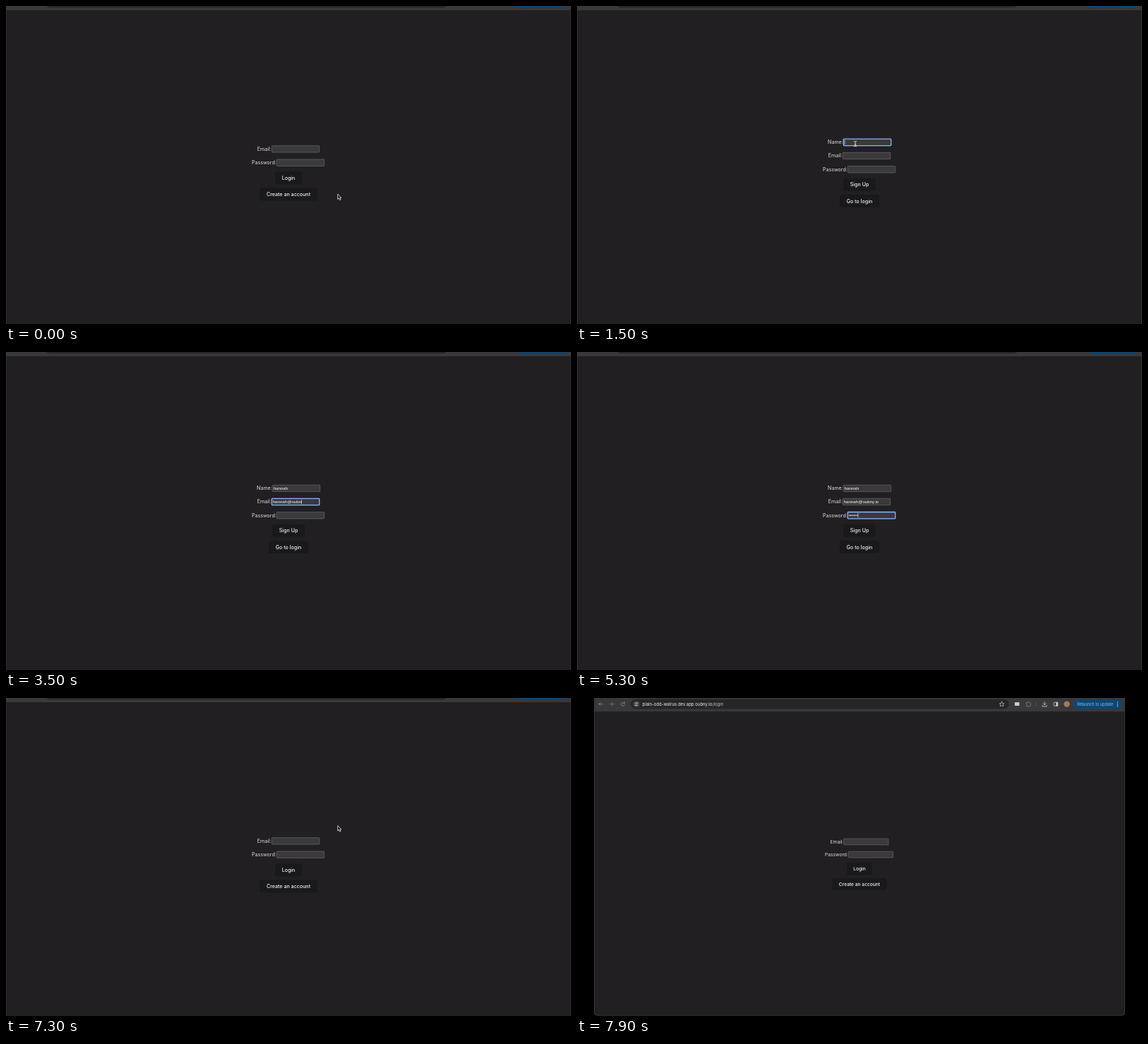
These frames come from a looping animation (800x450 px, 8 s). An HTML page:

```html
<!DOCTYPE html>
<html lang="en">
<head>
<meta charset="utf-8">
<title>Sign up flow</title>
<style>
  html, body { margin: 0; width: 100%; height: 100%; overflow: hidden; background: #000; }
  svg { display: block; width: 100%; height: 100%; }
  text { font-family: Inter, "Open Sans", sans-serif; white-space: pre; }
  .field { font-family: "Liberation Sans", Arial, sans-serif; font-size: 6.15px; fill: #fff; }
  .label { font-size: 7.1px; fill: #dededf; text-anchor: end; }
  .button { font-size: 7.1px; font-weight: 500; fill: #f4f4f5; text-anchor: middle; }
  .line { fill: none; stroke-linecap: round; stroke-linejoin: round; }
</style>
</head>
<body>
<svg id="stage" viewBox="0 0 800 450" preserveAspectRatio="none"></svg>
<script>
const LOOP = 8000, STEP = 100;
const ZOOM = { x: 24.4, y: 13.4, scale: 0.939 };
const NAME = "hannah", EMAIL = "hannah@oubny.io", PASSWORD = "•".repeat(10);
const RING = "#8cb6f2";

const clamp = v => Math.max(0, Math.min(1, v));

// Linear interpolation through [time, value...] keys.
function track(keys, t) {
  if (t <= keys[0][0]) return keys[0].slice(1);
  for (let i = 1; i < keys.length; i++) {
    const [a, b] = [keys[i - 1], keys[i]];
    if (t <= b[0]) {
      const k = (t - a[0]) / (b[0] - a[0]);
      return a.slice(1).map((v, j) => v + (b[j + 1] - v) * k);
    }
  }
  return keys[keys.length - 1].slice(1);
}

const rect = (x, y, w, h, r, fill, extra = "") =>
  `<rect x="${x}" y="${y}" width="${w}" height="${h}" rx="${r}" fill="${fill}" ${extra}/>`;
const line = (d, color, width = 0.8) =>
  `<path class="line" d="${d}" stroke="${color}" stroke-width="${width}"/>`;
const text = (x, y, size, fill, str, extra = "") =>
  `<text x="${x}" y="${y}" font-size="${size}" fill="${fill}" ${extra}>${str}</text>`;

function inputRow(id, label, x, y) {
  return `<text class="label" x="${x - 0.2}" y="${y + 2.4}">${label}</text>` +
    rect(x + 0.3, y - 4.7, 67.4, 9.4, 0.8, "#3a393c", `id="${id}-box" stroke="#727174" stroke-width="0.6"`) +
    `<text class="field" id="${id}-text" x="${x + 1.7}" y="${y + 2.1}"></text>` +
    `<path id="${id}-caret" stroke="#fff" stroke-width="0.6"/>`;
}

function button(id, label, y, w) {
  return rect(400 - w / 2, y - 9, w, 18, 3.5, "#19181a", `id="${id}-box"`) +
    `<text class="button" id="${id}-text" x="400" y="${y + 2.5}">${label}</text>`;
}

function asterisk(x, y, r, color, width) {
  let d = "";
  for (let i = 0; i < 3; i++) {
    const a = Math.PI / 2 + i * Math.PI / 3, dx = r * Math.cos(a), dy = r * Math.sin(a);
    d += `M${x - dx} ${y - dy}L${x + dx} ${y + dy}`;
  }
  return line(d, color, width);
}

// Drawn in the coordinates of the fully zoomed-out window.
function toolbar() {
  const soft = "#8b8a8d", bright = "#c9c8cb";
  return rect(24.4, -30, 751.2, 49, 0, "#39383b") +
    line("M36.5 8.5H31M33.5 6L31 8.5L33.5 11", soft) +
    line("M46 8.5H51.5M49 6L51.5 8.5L49 11", "#77767a") +
    line("M67.3 7.4A2.6 2.6 0 1 0 67.5 9.4M67.5 5.6V7.6H65.5", soft) +
    rect(76, 1.8, 535.5, 13.8, 6.9, "#262528") +
    `<circle cx="84" cy="8.7" r="5" fill="#39383b"/>` +
    line("M81.5 7.2H83.5M85.5 7.2H86.5M81.5 10.2H82.5M84.7 10.2H86.5", "#e0e0e2", 0.7) +
    `<circle cx="84.5" cy="7.2" r=".9" fill="none" stroke="#e0e0e2" stroke-width=".6"/>` +
    `<circle cx="83.6" cy="10.2" r=".9" fill="none" stroke="#e0e0e2" stroke-width=".6"/>` +
    text(92.5, 10.8, 6, "#f0f0f2", `plain-odd-walrus.dev.app.oubny.io<tspan fill="#c0bfc2">/login</tspan>`) +
    line("M601.5 5.2L602.5 7.5L605 7.8L603.1 9.4L603.7 11.9L601.5 10.6L599.3 11.9L599.9 9.4L598 7.8L600.5 7.5Z", bright, 0.7) +
    rect(619.8, 5.9, 6.6, 5.2, 0.6, bright) +
    line("M636.3 6.5H638A1 1 0 0 1 640 6.5H641.8V8A1 1 0 0 1 641.8 10V11.7H636.3V10A1 1 0 0 0 636.3 8Z", soft, 0.7) +
    line("M650.5 5.2V12", "#5d5c60", 0.6) +
    line("M662 5.4V9.7M660 7.8L662 9.8L664 7.8M659 10.5V12H665V10.5", bright) +
    rect(675.2, 6, 5.6, 5.4, 0.7, "none", `stroke="${bright}" stroke-width=".8"`) +
    rect(678.2, 6, 2.6, 5.4, 0.4, bright) +
    `<circle cx="693.5" cy="8.6" r="4.2" fill="#a87a4c"/>` +
    rect(702.5, 1.8, 69, 13.8, 6.9, "#0d4672") +
    text(708.2, 10.7, 5.6, "#8fbde3", "Relaunch to update") +
    [6, 8.7, 11.4].map(y => `<circle cx="765.4" cy="${y}" r=".8" fill="#b5d8f5"/>`).join("");
}

function popup() {
  const dim = "#3b3b3e", blue = "#a8c7fa", body = "#c4c3c6";
  const copy = [
    "The password that you just used was found in a data breach. To secure",
    "your accounts, Pelnor Password Manager recommends changing it",
    "now and checking your saved passwords."
  ];
  return rect(297.5, 2, 205, 149, 6, "#1e1d1f") +
    rect(297.5, 2, 205, 56, 6, "#1b1a1c") +
    line("M298 34C306 33 306 42 315 43S328 35 340 39", dim, 1.6) +
    line("M415 27C417 17 426 19 433 18S445 10 447 3", dim, 1.6) +
    asterisk(322, 26, 4.3, "#4a494d", 1.5) +
    rect(349, 10, 29, 42, 2, "#222124", `stroke="${dim}" stroke-width=".8"`) +
    rect(367, 15, 47, 30, 1.5, "#232225", `stroke="${dim}" stroke-width=".8"`) +
    line("M359 46.5H420M356 10H371", dim, 1.4) +
    rect(375, 26.5, 25, 11.5, 1, "#1b1a1c") +
    `<path d="M484.5 33A2 2 0 0 1 486 29.8A2.6 2.6 0 0 1 490.5 30.4A1.5 1.5 0 0 1 491 33Z" fill="${dim}"/>` +
    `<path d="M365 22.5L354.3 40H376Z" fill="#e8745f" stroke="#f1a294" stroke-width="1" stroke-linejoin="round"/>` +
    line("M365 28V34M365 37V37.1", "#3a1512", 1.6) +
    [378, 386, 392.8].map(x => asterisk(x + 0.4, 32.5, 2, "#8fb0f5", 1)).join("") +
    line("M397 29.7V35.3", "#8fb0f5", 0.9) +
    text(306.3, 73.8, 7.2, "#dddde0", "Check your saved passwords", `font-weight="500"`) +
    copy.map((s, i) => text(306.3, 90.5 + i * 9.3, 5.39, body, s)).join("") +
    `<circle cx="311.2" cy="131.5" r="2.9" fill="none" stroke="${body}" stroke-width=".7"/>` +
    line("M311.2 131.3V133M311.2 129.9V130", body, 0.7) +
    rect(393.2, 123.4, 31.4, 16.3, 8.1, "none", `stroke="#5f7890" stroke-width=".7"`) +
    text(408.9, 133.7, 5.9, blue, "Close", `font-weight="500" text-anchor="middle"`) +
    rect(428, 123, 66.2, 17, 8.5, blue) +
    text(461.1, 133.7, 5.85, "#0b305f", "Check Passwords", `font-weight="500" text-anchor="middle"`);
}

const stage = document.getElementById("stage");
stage.innerHTML = `
  <rect width="800" height="450" fill="#000"/>
  <g id="world">
    ${rect(0.2, -60, 799.6, 524, 4, "#211f22", `stroke="#454447" stroke-width=".8"`)}
    <g transform="scale(${1 / ZOOM.scale}) translate(${-ZOOM.x} ${-ZOOM.y})">${toolbar()}</g>
    <g id="login">
      ${inputRow("login-email", "Email:", 376, 202.4)}
      ${inputRow("login-pass", "Password:", 383, 221.7)}
      ${button("enter", "Login", 243.2, 38)}
      ${button("create", "Create an account", 266.4, 82)}
    </g>
    <g id="signup">
      ${inputRow("name", "Name:", 377, 192.9)}
      ${inputRow("email", "Email:", 376, 212)}
      ${inputRow("pass", "Password:", 383, 231.2)}
      ${button("submit", "Sign Up", 252.8, 46)}
      ${button("back", "Go to login", 276, 56)}
    </g>
    <g id="popup">${popup()}</g>
    <g id="arrow"><path d="M0 0V7.5L1.7 6L2.9 8.7L4.2 8.1L3 5.5H5.2Z" fill="#1a1a1a" stroke="#e6e6e6" stroke-width=".8" stroke-linejoin="round"/></g>
    <g id="beam">${line("M-1.7 -3.6Q0 -3.6 0 -2.6Q0 -3.6 1.7 -3.6M0 -2.6V2.8M-1.7 3.8Q0 3.8 0 2.8Q0 3.8 1.7 3.8M-1 1H1", "#e8e8e8", 0.8)}</g>
  </g>`;

const el = {};
stage.querySelectorAll("[id]").forEach(node => el[node.id] = node);
const show = (id, on) => el[id].setAttribute("display", on ? "inline" : "none");

const POINTER = [
  [200, 469.7, 266], [600, 412, 265], [700, 410, 265], [1000, 412, 248], [1400, 394, 195], [5900, 394, 195],
  [6200, 405, 251], [6400, 462.8, 205], [6800, 470.5, 186], [7200, 469.7, 180.5]
];
const FIELDS = [
  { id: "name", value: NAME, x: 378.7, y: 192.9, focus: [1400, 2600], keys: [[1700, 0], [2300, 6]] },
  { id: "email", value: EMAIL, x: 377.7, y: 212, focus: [2600, 4600],
    keys: [[2700, 0], [3500, 11], [3900, 13], [4200, 13], [4500, 15]] },
  { id: "pass", value: PASSWORD, x: 384.7, y: 231.2, focus: [4600, 6200], keys: [[4800, 0], [5300, 6], [5700, 10]] }
];

function drawField(f, t) {
  const focused = t >= f.focus[0] && t < f.focus[1];
  const node = el[f.id + "-text"], box = el[f.id + "-box"], caret = el[f.id + "-caret"];
  node.textContent = f.value.slice(0, Math.floor(track(f.keys, t)[0] + 0.01));
  box.setAttribute("stroke", focused ? RING : "#727174");
  box.setAttribute("stroke-width", focused ? 1.3 : 0.6);
  const x = f.x + (node.textContent ? node.getComputedTextLength() : 0) + 0.3;
  caret.setAttribute("d", focused ? `M${x} ${f.y - 3.3}V${f.y + 3.3}` : "");
}

function draw(time) {
  const t = Math.floor((time % LOOP) / STEP) * STEP;
  const signup = t >= 700 && t < 7000;
  show("login", !signup);
  show("signup", signup);
  if (signup) FIELDS.forEach(f => drawField(f, t));

  const loading = t >= 6200;
  const box = el["submit-box"], w = loading ? 52 : 46;
  el["submit-text"].textContent = loading ? "Loading..." : "Sign Up";
  box.setAttribute("x", 400 - w / 2);
  box.setAttribute("width", w);
  box.setAttribute("stroke", loading ? RING : "none");
  box.setAttribute("stroke-width", 1.3);

  show("popup", t > 7400 && t < 7800);
  el.popup.setAttribute("opacity", clamp((t - 7400) / 300));

  const [x, y] = track(POINTER, t);
  const beam = t >= 1300 && t < 1700;
  const arrow = t < 1300 || (t >= 6000 && t < 7800);
  show("beam", beam);
  show("arrow", arrow);
  el[beam ? "beam" : "arrow"].setAttribute("transform", `translate(${x} ${y})`);

  const z = clamp((t - 7700) / 200);
  el.world.setAttribute("transform",
    `translate(${ZOOM.x * z} ${ZOOM.y * z}) scale(${1 + (ZOOM.scale - 1) * z})`);
}

const start = performance.now();
function tick() {
  draw(performance.now() - start);
  requestAnimationFrame(tick);
}
tick();
</script>
</body>
</html>
```
